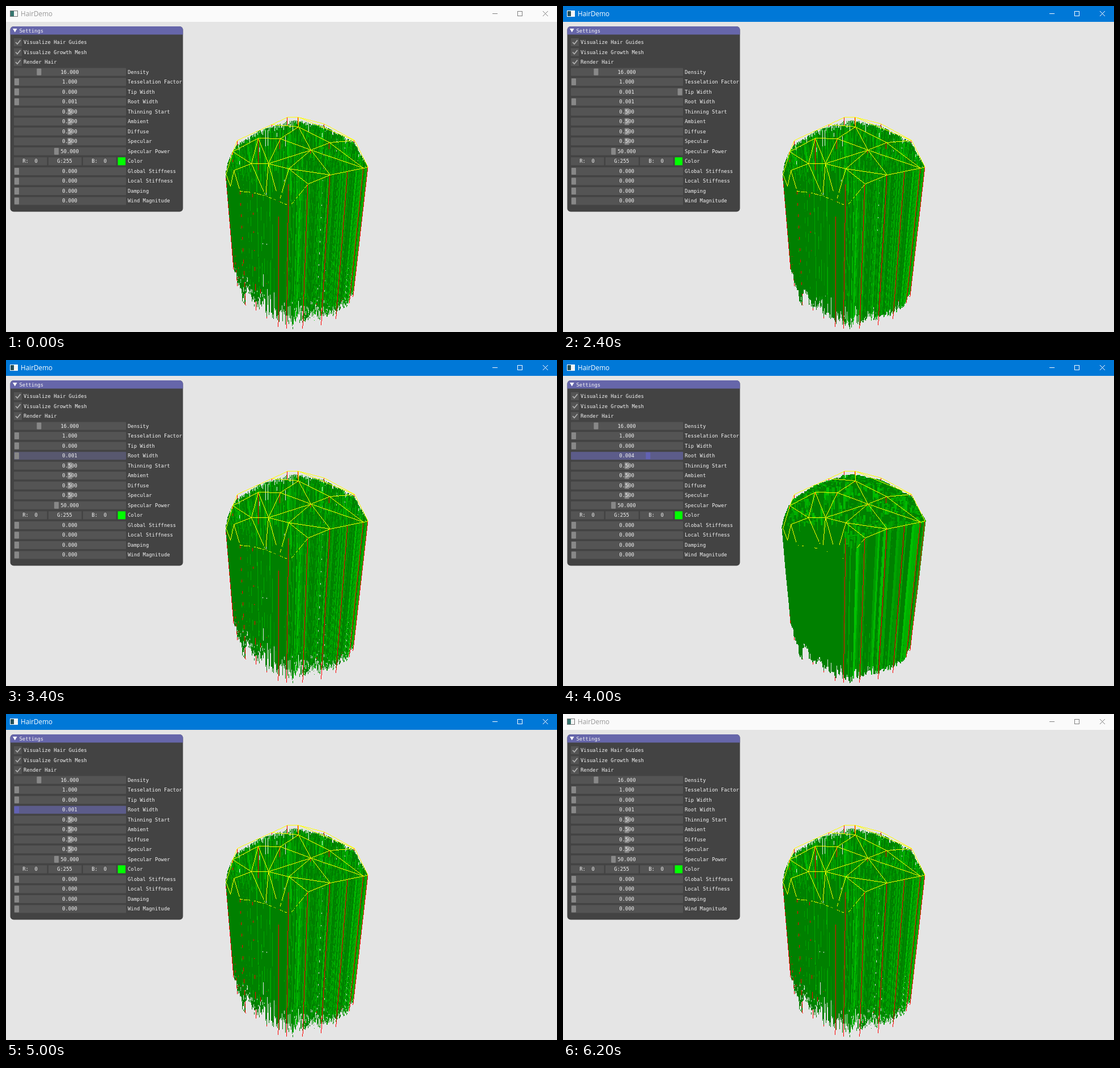
An HTML page with a canvas for the animation above (6300 ms loop, 973 by 576 pixels).

```html
<!DOCTYPE html>
<html>
<head>
<meta charset="utf-8">
<title>HairDemo</title>
<style>
  html, body { margin: 0; width: 100%; height: 100%; overflow: hidden; background: #e5e5e5; }
  canvas { display: block; }
</style>
</head>
<body>
<canvas id="stage" width="973" height="576"></canvas>
<script>
const W = 973, H = 576, LOOP = 6300;
const ctx = document.getElementById('stage').getContext('2d');
const hairCanvas = document.createElement('canvas');
hairCanvas.width = W;
hairCanvas.height = H;
const hairCtx = hairCanvas.getContext('2d');
const image = hairCtx.createImageData(W, H);
const pixels = new Uint32Array(image.data.buffer);
const RED = 0xff0000ff, YELLOW = 0xff00ffff;

// Interaction timeline; slider positions run from 0 to 1.
const IDLE = 0, HOVER = 1, ACTIVE = 2;
const steps = [
  // time, tip state, tip position, root state, root position
  [0, IDLE, 0, IDLE, 0],
  [1300, ACTIVE, 0, IDLE, 0],
  [1700, ACTIVE, 1, IDLE, 0],
  [2400, IDLE, 1, IDLE, 0],
  [2500, HOVER, 1, IDLE, 0],
  [2700, ACTIVE, 1, IDLE, 0],
  [2900, ACTIVE, 0, IDLE, 0],
  [3200, HOVER, 0, IDLE, 0],
  [3400, IDLE, 0, HOVER, 0],
  [3800, IDLE, 0, ACTIVE, 0],
  [3900, IDLE, 0, ACTIVE, 0.3],
  [4000, IDLE, 0, ACTIVE, 0.7],
  [4100, IDLE, 0, ACTIVE, 1],
  [4700, IDLE, 0, ACTIVE, 0.75],
  [4800, IDLE, 0, ACTIVE, 0.5],
  [4900, IDLE, 0, ACTIVE, 0.2],
  [5000, IDLE, 0, ACTIVE, 0],
  [5400, IDLE, 0, HOVER, 0],
  [5500, HOVER, 0, IDLE, 0],
  [5600, IDLE, 0, IDLE, 0]
];

// ---- Hair ----
const lerp = (a, b, t) => a + (b - a) * t;

// Height of a polyline (flat list of x, y) at x.
function heightAt(line, x) {
  let i = 0;
  while (i < line.length - 4 && x > line[i + 2]) i += 2;
  const t = (x - line[i]) / (line[i + 2] - line[i]);
  return lerp(line[i + 1], line[i + 3], Math.max(0, Math.min(1, t)));
}

const backEdge = [388, 295, 392, 275, 400, 255, 408, 244, 445, 220, 497, 202, 516, 201, 562, 211, 615, 240, 639, 283];
const frontEdge = [388, 298, 396, 318, 413, 327, 435, 329, 458, 335, 482, 345, 501, 353, 533, 316, 572, 300, 631, 290, 639, 286];
const tipEdge = [402, 465, 407, 488, 421, 538, 427, 508, 433, 530, 446, 542, 455, 541, 463, 556, 472, 555, 482, 568,
  489, 560, 499, 576, 510, 574, 517, 562, 524, 570, 540, 558, 555, 565, 567, 554, 579, 557, 591, 541, 602, 538, 607, 522, 613, 513];

let seed = 7;
function random() {
  seed = (seed + 0x6d2b79f5) | 0;
  let n = Math.imul(seed ^ (seed >>> 15), 1 | seed);
  n = (n + Math.imul(n ^ (n >>> 7), 61 | n)) ^ n;
  return ((n ^ (n >>> 14)) >>> 0) / 4294967296;
}

const tipX = x => 402 + 0.84 * (x - 388);
const tipY = (x, y) => heightAt(tipEdge, tipX(x)) - 0.35 * (heightAt(frontEdge, x) - y);

// Everything in the scene, painted from back to front by depth.
const scene = [];
for (let i = 0; i < 1700; i++) {
  const x = lerp(388, 639, random());
  // The far rim of the dome is seen edge-on, so roots crowd there.
  const depth = random() < 0.35 ? 0.1 * random() : random();
  const y = lerp(heightAt(backEdge, x), heightAt(frontEdge, x), depth);
  const litChance = x > 497 || y < 288 ? 0.42 : 0;
  const green = random() < litChance ? Math.round(lerp(145, 195, random())) : 128;
  scene.push({ kind: 'strand', depth: y, x, y, endX: tipX(x), endY: tipY(x, y) - 2 - 10 * random(), color: 0xff000000 | green << 8 });
}

const vertices = {
  a: [400, 257], b: [408, 237], c: [445, 233], d: [484, 234], e: [516, 213], f: [538, 254], g: [571, 241],
  h: [615, 237], i: [639, 284], j: [631, 286], k: [572, 298], l: [533, 314], m: [499, 287], n: [463, 278],
  o: [433, 278], p: [402, 290], q: [388, 297], r: [469, 209], s: [497, 196], t: [516, 196], u: [562, 208],
  v: [396, 318], w: [413, 327], x: [435, 329], y: [458, 335], z: [482, 345], A: [501, 353]
};
function addEdges(names, depth) {
  for (const [from, to] of names.split(' ')) {
    const [x, y] = vertices[from], [endX, endY] = vertices[to];
    scene.push({ kind: 'edge', depth, x, y, endX, endY });
  }
}
addEdges('ab br rs st tu uh th hi ac cd co cn dn de df ef eg fg fm fn fk fj gj gh kj ji kl lm mk mn no ao op aq re te', 1000);
addEdges('qv pv pw wx xy yz zA Al oy ny nz mz', 318);

function addGuide(x, y, depth, endY) {
  scene.push({ kind: 'guide', depth, x, y, endX: tipX(x), endY });
}
for (const name of 'abcdefghrstu') {
  const [x, y] = vertices[name];
  addGuide(x, y, y + 3, tipY(x, y));
}
for (const [x, y] of [[388, 297], [396, 318], [413, 327], [435, 329], [458, 335], [482, 345],
  [499, 315], [533, 314], [572, 299], [603, 292], [631, 286], [639, 284]]) {
  addGuide(x, y, x > 490 ? 900 : y - 15, heightAt(tipEdge, tipX(x)));
}
scene.sort((p, q) => p.depth - q.depth);

function drawHanging({ x, y, endX, endY, color }, rootWidth, tipWidth) {
  const last = Math.min(endY, H - 1);
  for (let row = Math.ceil(y); row <= last; row++) {
    const t = (row - y) / (endY - y);
    const center = lerp(x, endX, t);
    const half = lerp(rootWidth, tipWidth, Math.max(0, 2 * t - 1)) / 2;
    const start = Math.round(center - half), end = Math.round(center + half);
    if (end > start) pixels.fill(color, row * W + start, row * W + end);
  }
}

function drawEdge({ x, y, endX, endY }) {
  const count = Math.max(Math.abs(endX - x), Math.abs(endY - y));
  for (let i = 0; i <= count; i++) {
    const t = i / count;
    pixels[Math.round(lerp(y, endY, t)) * W + Math.round(lerp(x, endX, t))] = YELLOW;
  }
}

function renderHair(tip, root) {
  const rootWidth = 1.1 * (1 + 4 * root), tipWidth = Math.max(0.4 * rootWidth, 1.1 * tip);
  pixels.fill(0);
  for (const item of scene) {
    if (item.kind === 'edge') drawEdge(item);
    else if (item.kind === 'guide') drawHanging({ ...item, color: RED }, 1, 1);
    else drawHanging(item, rootWidth, tipWidth);
  }
  hairCtx.putImageData(image, 0, 0);
}

// ---- Window and panel ----
function box(x, y, w, h, color) {
  ctx.fillStyle = color;
  ctx.fillRect(x, y, w, h);
}

function roundBox(x, y, w, h, radius, color) {
  ctx.fillStyle = color;
  ctx.beginPath();
  ctx.roundRect(x, y, w, h, radius);
  ctx.fill();
}

function stroke(points, color, width = 1) {
  ctx.strokeStyle = color;
  ctx.lineWidth = width;
  ctx.beginPath();
  points.forEach(([x, y]) => ctx.lineTo(x, y));
  ctx.stroke();
}

function text(string, x, y, align = 'left') {
  ctx.font = '8.85px "DejaVu Sans Mono", monospace';
  ctx.textAlign = align;
  ctx.fillStyle = '#f4f4f4';
  ctx.fillText(string, x, y);
}

function drawTitleBar(focused) {
  box(0, 0, W, 28, focused ? '#0078d7' : '#fafafa');
  box(7, 8, 14, 11, focused ? '#ffffff' : '#747474');
  box(8, 9, 12, 9, '#f4f4f4');
  box(8, 9, 6, 9, focused ? '#24505a' : '#37756f');
  ctx.font = '11.75px "Open Sans", sans-serif';
  ctx.textAlign = 'left';
  ctx.fillStyle = focused ? '#ffffff' : '#969696';
  ctx.fillText('HairDemo', 26, 18);
  const ink = focused ? '#ffffff' : '#808080';
  stroke([[859, 13.5], [868, 13.5]], ink);
  ctx.strokeRect(903.5, 9.5, 8, 8);
  stroke([[948, 9], [957, 18]], ink);
  stroke([[957, 9], [948, 18]], ink);
}

const rowCenter = index => 64 + 17.53 * index;

function drawCheckbox(index, label) {
  const y = rowCenter(index);
  box(14, y - 7, 14, 14, '#545454');
  stroke([[17, y], [20, y + 3.2], [25.5, y - 3.6]], '#b0b0b0', 1.7);
  text(label, 31, y + 3);
}

function drawSlider(index, label, value, position, state = IDLE) {
  const y = rowCenter(index);
  roundBox(14, y - 7, 198, 14, 1, ['#545454', '#58586f', '#5c5c8a'][state]);
  roundBox(lerp(15, 202.5, position), y - 6, 8, 12, 1, state === ACTIVE ? '#6262b4' : '#888888');
  text(value.toFixed(3), 112.5, y + 3, 'center');
  text(label, 215, y + 3);
}

function drawColorRow(index) {
  const y = rowCenter(index);
  [['R:  0', 14], ['G:255', 75], ['B:  0', 136]].forEach(([value, x]) => {
    box(x, y - 7, 58.5, 14, '#545454');
    text(value, x + 28.5, y + 3, 'center');
  });
  box(197.5, y - 7, 13.5, 14, '#00ff00');
  text('Color', 215, y + 3);
}

function drawPanel([, tipState, tip, rootState, root]) {
  roundBox(7.5, 36, 305, 327.5, 6, '#434343');
  roundBox(7.5, 36, 305, 14.5, [6, 6, 0, 0], '#6666aa');
  ctx.fillStyle = '#ffffff';
  ctx.beginPath();
  ctx.moveTo(12, 40);
  ctx.lineTo(19.5, 40);
  ctx.lineTo(15.75, 46.5);
  ctx.fill();
  text('Settings', 23.5, 46.5);

  ['Visualize Hair Guides', 'Visualize Growth Mesh', 'Render Hair'].forEach((label, i) => drawCheckbox(i, label));
  drawSlider(3, 'Density', 16, 0.21);
  drawSlider(4, 'Tesselation Factor', 1, 0);
  drawSlider(5, 'Tip Width', 0.001 * tip, tip, tipState);
  drawSlider(6, 'Root Width', 0.001 + 0.004 * root, root, rootState);
  ['Thinning Start', 'Ambient', 'Diffuse', 'Specular'].forEach((label, i) => drawSlider(7 + i, label, 0.5, 0.5));
  drawSlider(11, 'Specular Power', 50, 0.374);
  drawColorRow(12);
  ['Global Stiffness', 'Local Stiffness', 'Damping', 'Wind Magnitude'].forEach((label, i) => drawSlider(13 + i, label, 0, 0));
}

let hairKey = '';
function frame() {
  const time = performance.now() % LOOP;
  const step = steps.findLast(([start]) => start <= time);
  const key = step[2] + '/' + step[4];
  if (key !== hairKey) {
    renderHair(step[2], step[4]);
    hairKey = key;
  }
  box(0, 0, W, H, '#e5e5e5');
  ctx.drawImage(hairCanvas, 0, 0);
  drawTitleBar(time >= 1300 && time < 6200);
  drawPanel(step);
  requestAnimationFrame(frame);
}
frame();
</script>
</body>
</html>
```
